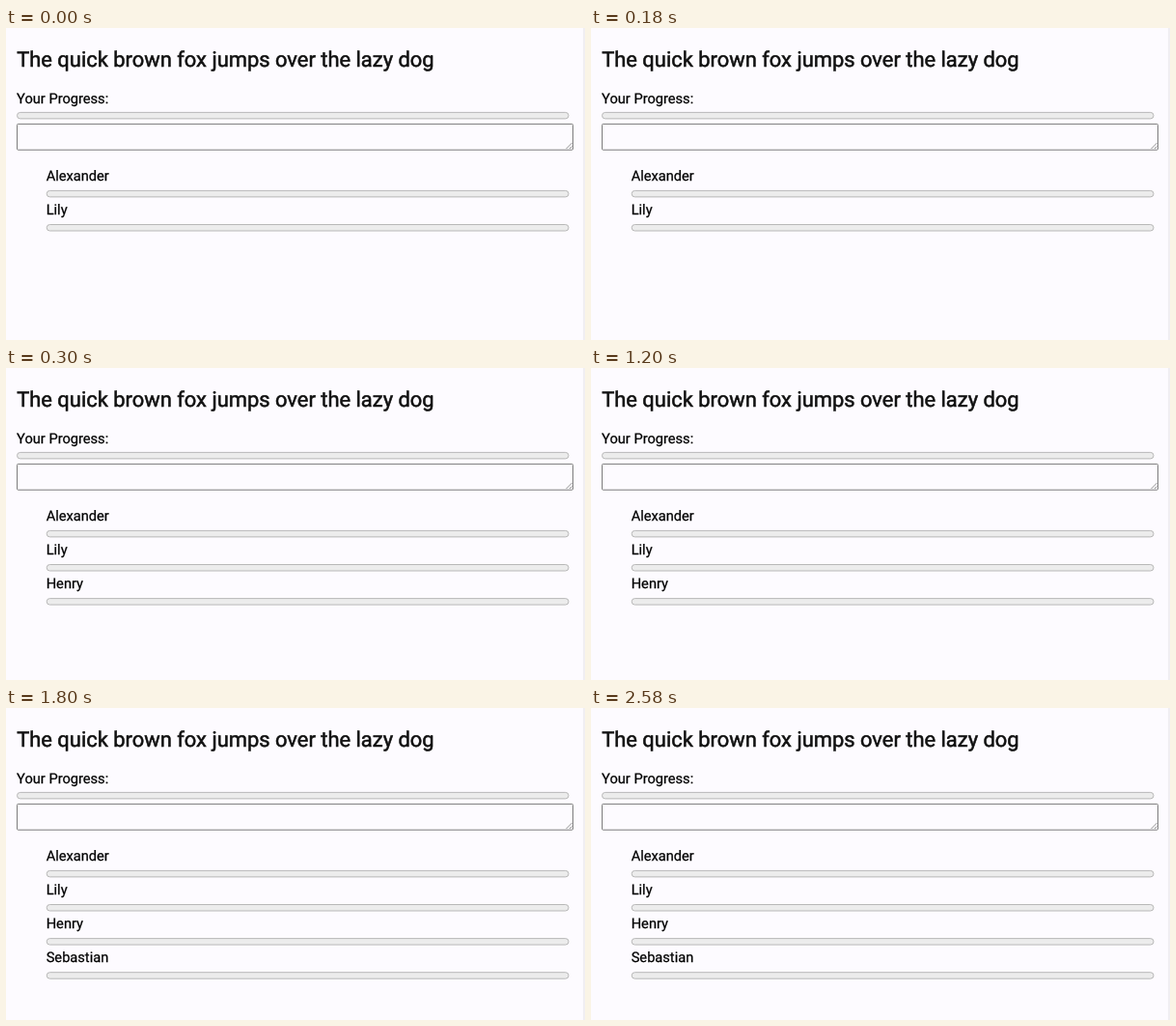
Write an HTML page that moves like this. It is 600 px wide and 323 px high and loops after 3.1 s.

```html
<!DOCTYPE html>
<html lang="en">
<head>
<meta charset="utf-8">
<title>Typing race</title>
<style>
  html, body { margin: 0; width: 100%; height: 100%; overflow: hidden; background: #fdfbff; }
  svg { display: block; }
  text {
    font: 400 14.64px Roboto, Arial, sans-serif;
    fill: #000;
    stroke: #000;
    stroke-width: .25px;
    text-rendering: geometricPrecision;
  }
  .title { font-size: 21.92px; fill: #111; stroke: #111; stroke-width: .55px; }
  .bar { fill: #ececec; stroke: #b2b2b2; stroke-width: .9; }
  .field { fill: #fdfbff; stroke: #7c7c7c; stroke-width: 1; }
  .grip { fill: none; stroke: #777; stroke-width: .8; }
  .edge { fill: #e3e1e5; }
</style>
</head>
<body>
<svg id="stage" width="600" height="323" viewBox="0 0 600 323">
  <rect class="edge" x="598.5" y="0" width="1" height="323"/>
  <text class="title" x="11.2" y="40.1">The quick brown fox jumps over the lazy dog</text>
  <text x="11.1" y="77.5">Your Progress:</text>
  <rect class="field" x="11.5" y="99.4" width="576" height="26.8" rx="1"/>
  <path class="grip" d="M580.5 125 L586.5 119 M584 125 L586.5 122.5"/>
</svg>
<script>
const LOOP = 3100;
const LEFT = 42, RIGHT = 583, ROW_STEP = 35.1;
const racers = [
  { name: "Alexander", joins: 0 },
  { name: "Lily", joins: 0 },
  { name: "Henry", joins: 300 },
  { name: "Sebastian", joins: 1800 },
];
const stage = document.getElementById("stage");

function add(parent, tag, attrs, content = "") {
  const node = document.createElementNS(stage.namespaceURI, tag);
  for (const key in attrs) node.setAttribute(key, attrs[key]);
  node.textContent = content;
  return parent.appendChild(node);
}

function addBar(parent, x, y) {
  add(parent, "rect", { class: "bar", x, y, width: RIGHT - x, height: 6.5, rx: 3.25 });
}

addBar(stage, 11.5, 87.4);

const rows = racers.map(({ name }, i) => {
  const row = add(stage, "g", {});
  const y = 158.1 + i * ROW_STEP;
  add(row, "text", { x: LEFT - 0.3, y }, name);
  addBar(row, LEFT + 0.2, y + 10.3);
  return row;
});

const start = performance.now();

function draw(now) {
  const t = Math.max(0, now - start) % LOOP;
  racers.forEach(({ joins }, i) => {
    rows[i].style.visibility = t >= joins ? "visible" : "hidden";
  });
  requestAnimationFrame(draw);
}

draw(start);
</script>
</body>
</html>
```
